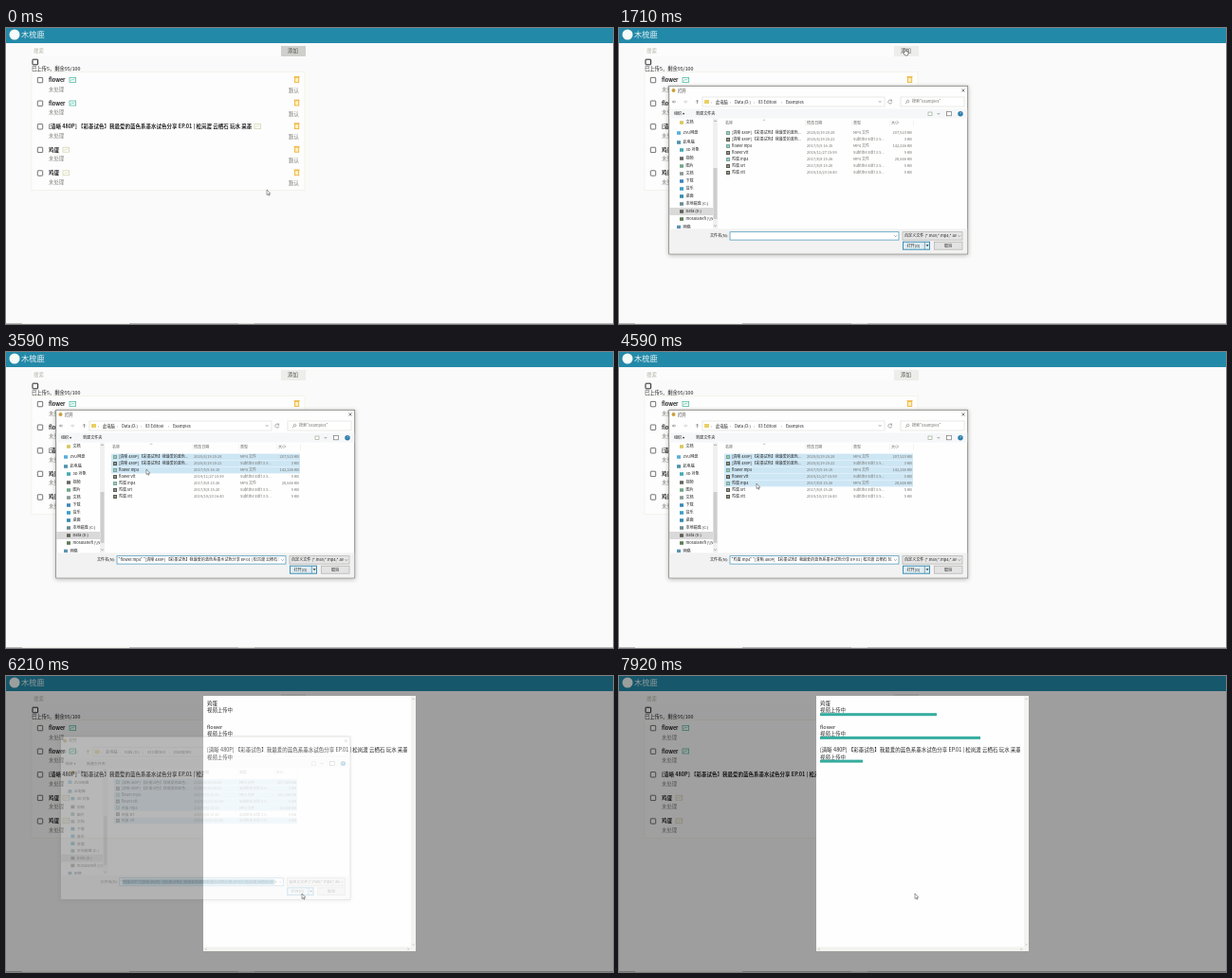
These frames come from a looping animation (640 by 313 pixels, 8 s). An HTML page:

```html
<!DOCTYPE html>
<html lang="zh-CN">
<head>
<meta charset="utf-8">
<title>上传视频</title>
<style>
  html, body { margin: 0; width: 100%; height: 100%; overflow: hidden; background: #fafafa; }
  #stage { display: block; width: 100vw; height: 100vh; }
  text { font-family: "Noto Sans CJK SC", "Noto Sans CJK", "Noto Sans", sans-serif; white-space: pre; }
</style>
</head>
<body>
<svg id="stage" viewBox="0 0 640 313"></svg>
<script>
const LOOP = 8000;
const INK = '#222', MUTED = '#858580', BLUE = '#3f8fb4';
const TITLE = '[清晰 480P] 【彩墨试色】我最爱的蓝色系墨水试色分享 EP.01 | 松岚渡 云栖石 玩水 采墨';
const SHORT = '[清晰 480P] 【彩墨试色】我最爱的蓝色...';

// Markup helpers; text is placed by its vertical centre.
const text = (x, cy, str, size = 5.5, fill = INK, attrs = '') =>
  `<text x="${x}" y="${cy + size * 0.36}" font-size="${size}px" fill="${fill}" ${attrs}>${str}</text>`;
const rect = (x, y, w, h, fill, attrs = '') =>
  `<rect x="${x}" y="${y}" width="${w}" height="${h}" fill="${fill}" ${attrs}/>`;
const box = (x, y, w, h, fill, stroke, width = 0.7, attrs = '') =>
  rect(x, y, w, h, fill, `stroke="${stroke}" stroke-width="${width}" ${attrs}`);
const path = (d, stroke, width = 0.7, fill = 'none') =>
  `<path d="${d}" fill="${fill}" stroke="${stroke}" stroke-width="${width}"/>`;
const circle = (x, y, r, fill) => `<circle cx="${x}" cy="${y}" r="${r}" fill="${fill}"/>`;
const group = (id, content, attrs = '') => `<g id="${id}" ${attrs}>${content}</g>`;
const clip = (x, y, w, h, content) =>
  `<svg x="${x}" y="${y}" width="${w}" height="${h}" viewBox="${x} ${y} ${w} ${h}">${content}</svg>`;

function videoRow([name, iconX, iconColor], i) {
  const y = 55 + i * 24.6;
  return box(33.3, y - 2.6, 5.4, 5.4, '#fff', '#505050', 0.8, 'rx=".6"') +
    text(45, y, name, 5.5, INK, 'font-weight="700"') +
    box(iconX, y - 2.6, 6.6, 5, '#fdfdfb', iconColor, 0.8) +
    path(`M${iconX + 1} ${y + 1.2}l1.6-2 1.4 1 1.6-1.6`, iconColor) +
    text(45, y + 9.6, '未处理', 5.4, MUTED) +
    box(304.5, y - 2.8, 4.2, 5.2, '#fff0b8', '#eeb33c', 0.9) +
    path(`M303.6 ${y - 3.4}h6`, '#eeb33c', 0.9) +
    text(298, y + 11, '默认', 5.4, '#757570');
}

function page() {
  const videos = [
    ['flower', 67, '#55bda9'], ['flower', 67, '#55bda9'], [TITLE, 262, '#d8d6b4'],
    ['鸡蛋', 60, '#d8d6b4'], ['鸡蛋', 60, '#d8d6b4']
  ];
  return rect(0, 0, 640, 313, '#fafafa') +
    rect(0, 0, 640, 16, '#2389a9') + circle(9, 7, 5.5, '#f4fbf8') +
    text(16, 7, '木梳鹿', 8.2, '#e4f1f2') +
    rect(27, 19, 262, 11.5, '#fcfcfc') + text(29, 24.5, '搜索', 5.4, '#b2b2a6') +
    rect(290, 19, 26, 11, '#ededea') + rect(290, 19, 26, 11, '#c6c6c0', 'id="pressed"') +
    text(297, 24.5, '添加', 5.4, '#505050') +
    box(28, 33.2, 5.6, 5.6, '#fff', '#222', 1, 'rx=".5"') +
    text(27, 43.5, '已上传5，剩余95/100', 5.3) +
    box(27, 46.5, 288, 125, '#fdfdfd', '#f0f0e6') +
    videos.map(videoRow).join('') +
    rect(0, 312, 640, 1, '#b9b9b9') + rect(17, 312, 113, 1, '#f0f0ea') + rect(245, 312, 17, 1, '#dcdcd8');
}

const files = [
  [SHORT, '2020/4/19 20:28', '207,523 KB'],
  [SHORT, '2020/4/19 20:22', '3 KB'],
  ['flower.mp4', '2017/5/5 16:15', '142,246 KB'],
  ['flower.vtt', '2019/11/27 15:59', '5 KB'],
  ['鸡蛋.mp4', '2017/8/8 15:26', '28,646 KB'],
  ['鸡蛋.srt', '2017/8/8 15:20', '5 KB'],
  ['鸡蛋.vtt', '2019/10/23 16:40', '5 KB']
];
// Moment each file is clicked; the sixth is skipped.
const pickedAt = [2650, 3080, 3520, 3980, 4430, Infinity, 5090];

function fileRow([name, date, size], i) {
  const y = 111 + i * 7, isVideo = i % 2 === 0 && i < 6;
  return rect(111, y - 3.4, 199, 6.8, '#cde6f4', `id="row${i}"`) +
    rect(113, y - 2, 4, 4, isVideo ? '#78a99c' : '#5a5a50') +
    path(`M114 ${y}h2`, '#fff') + text(119, y, name, 4) +
    text(198, y, date, 4, '#757570') +
    text(247, y, isVideo ? 'MP4 文件' : 'Subtitle Edit 3.5...', 4, '#757570') +
    text(309, y, size, 4, '#757570', 'text-anchor="end"');
}

function sidebar() {
  const places = [
    ['文档', 100, '#d8c860'], ['ZVU网盘', 111, '#5aaedb', 1], ['此电脑', 121, '#4f93ad', 1],
    ['3D 对象', 129, '#4aa8b4'], ['视频', 138, '#666660'], ['图片', 146, '#70a78b'],
    ['文档', 154, '#8b9a96'], ['下载', 162, '#3d88ba'], ['音乐', 170, '#3d9fc7'],
    ['桌面', 178, '#398cae'], ['本地磁盘 (C:)', 186, '#6e8b95'], ['Data (D:)', 194, '#60605a'],
    ['mosulanefi (\\\\v', 202, '#5f7d56'], ['网络', 210.5, '#5b93b0', 1]
  ];
  const items = places.map(([name, y, color, root]) => {
    const x = root ? 61 : 64;
    return rect(x, y - 1.8, 4, 3.6, color) + text(x + 6.5, y, name, 4.1);
  }).join('');
  return clip(53, 96, 46, 116.5, rect(53, 190, 46, 8, '#d9d9d9') + items) +
    rect(99, 96, 5, 116, '#f0f0f0') + rect(99.5, 148, 4, 54, '#cdcdcd') +
    path('M100.3 99l1.2-1.2 1.2 1.2M100.3 208.5l1.2 1.2 1.2-1.2', '#777');
}

function dialog() {
  const crumbs = [[102, '此电脑'], [122, 'Data (D:)'], [147, '03 Editool'], [176, 'Examples']];
  return box(52.7, 61.3, 315, 177.6, '#fefefe', '#85857c', 0.9, 'filter="url(#shadow)"') +
    circle(57.5, 66, 2, '#c9a13c') + text(62, 66, '打开', 4.2) +
    path('M361.5 64.5l3 3m0-3l-3 3', '#555') +
    path('M60 78h-3.5m1.4-1.4L56.5 78l1.4 1.4', '#777') +
    path('M68 78h3.5m-1.4-1.4l1.4 1.4-1.4 1.4', '#c0c0b8') +
    path('M82.5 80v-3.8m-1.4 1.4l1.4-1.4 1.4 1.4', '#777') +
    box(88, 73, 192, 10, '#fff', '#dededa') + rect(90, 76, 5, 4, '#e9cf62') +
    crumbs.map(([x, s]) => text(x - 5, 78, '›', 4.2, '#777') + text(x, 78, s, 4.2)).join('') +
    path('M273.8 77.2l1.3 1.3 1.3-1.3', '#777') +
    path('M287.6 77a2 2 0 1 0 .2 1.6m-.2-3v1.6h-1.5', '#777', 0.6) +
    box(297, 73, 67, 10, '#fff', '#dededa') +
    path('M302 80l1.5-1.6a1.3 1.3 0 1 1 .2.2', '#777', 0.6) +
    text(309, 78, '搜索"Examples"', 4.1, '#757570') +
    rect(53.2, 85.5, 314, 10, '#f6f7f8') +
    text(58, 90.5, '组织 ▾', 4.1) + text(81, 90.5, '新建文件夹', 4.1) +
    box(326, 89, 4, 3.5, '#fff', '#9cab98') + path('M335.6 90l1.3 1.3 1.3-1.3', '#777') +
    box(345.5, 88.5, 5, 4.3, '#fff', '#777') + circle(360, 90.7, 2.7, '#287caa') +
    text(360, 90.7, '?', 4, '#fff', 'text-anchor="middle"') +
    sidebar() +
    [[112, '名称'], [198, '修改日期'], [247, '类型'], [287, '大小']]
      .map(([x, s]) => text(x, 100.5, s, 4.1, '#6a6a66')).join('') +
    path('M152 98l1.2-1.2 1.2 1.2', '#888', 0.5) +
    path('M196.5 97v7M245.5 97v7M285.5 97v7M310.5 97v7', '#e8e8e4', 0.5) +
    files.map(fileRow).join('') +
    rect(53.2, 212.5, 314, 26, '#f2f2f2') +
    text(96, 220, '文件名(N):', 4.1) +
    box(117, 215.7, 178, 8.4, '#fff', BLUE) +
    rect(120, 217.2, 165, 5.4, '#4a9cc5', 'id="fieldMark"') +
    clip(118, 216, 170, 8, text(118.5, 220, '', 4.1, INK, 'id="fileName"')) +
    path('M290.3 219.3l1.3 1.3 1.3-1.3', '#777') +
    box(299, 215.7, 63, 8.4, '#e6e6e6', '#b0b0ac') +
    clip(300, 216, 56, 8, text(301, 220, '自定义文件 (*.m4v;*.mp4;*.avi', 4.1)) +
    path('M357.5 219.3l1.3 1.3 1.3-1.3', '#777') +
    box(299.5, 226.2, 28, 8, '#e1edf2', BLUE, 1) + path('M322.3 226v8', BLUE) +
    text(303.5, 230.2, '打开(O)', 4.1) +
    path('M323.8 229.3h2.6l-1.3 1.7z', '#333', 0.2, '#333') +
    box(332.5, 226.2, 29.5, 8, '#e3e3e3', '#b0b0ac') + text(343, 230.2, '取消', 4.1);
}

function uploads() {
  const entries = ['鸡蛋', 'flower', TITLE].map((name, i) => {
    const y = 29 + i * 24.7;
    return clip(212, y - 5, 211, 10, text(212, y, name)) + text(212, y + 7.2, '视频上传中', 5.4, '#333') +
      rect(212, y + 10.2, 0, 3, '#35ad9f', `id="bar${i}"`);
  }).join('');
  return rect(0, 0, 640, 313, 'rgba(0,0,0,.37)') +
    rect(208, 21, 224, 270, '#fefefe') + entries +
    rect(427, 21, 5, 270, '#f3f3f0') + rect(208, 286.5, 224, 4.5, '#f3f3f0') +
    path('M428.4 25l1.2-1.2 1.2 1.2M428.4 283.5l1.2 1.2 1.2-1.2M211.5 287.6l-1.2 1.2 1.2 1.2M423.5 287.6l1.2 1.2-1.2 1.2', '#aaa', 0.6);
}

const arrow = path('M0 0V5.6L1.3 4.4 2.1 6.3 2.9 6 2.1 4.2H3.8Z', '#3c3c3c', 0.5, '#fff');
const hand = path('M0 .6Q.7-.5 1.4.6V2.6L4 3.2V5.4L3.3 7H.6L-1.4 4.3-.8 3.7 0 4.2Z', '#3c3c3c', 0.6, '#fff');

document.getElementById('stage').innerHTML =
  '<filter id="shadow" x="-10%" y="-10%" width="120%" height="120%"><feDropShadow dx="0" dy="1" stdDeviation="2.2" flood-color="#333" flood-opacity=".35"/></filter>' +
  page() + group('modal', uploads()) + group('picker', dialog()) +
  group('cursor', group('arrow', arrow) + group('hand', hand));

const el = id => document.getElementById(id);
const show = (id, visible) => el(id).setAttribute('visibility', visible ? 'inherit' : 'hidden');
const clamp = v => Math.max(0, Math.min(1, v));
const ramp = (t, from, to) => clamp((t - from) / (to - from));
const smooth = u => u * u * (3 - 2 * u);

// Keys are [time, ...values]; returns the values at time t.
function track(keys, t, ease = u => u) {
  if (t <= keys[0][0]) return keys[0].slice(1);
  const next = keys.findIndex(k => k[0] > t);
  if (next < 0) return keys[keys.length - 1].slice(1);
  const a = keys[next - 1], b = keys[next], u = ease(ramp(t, a[0], b[0]));
  return a.slice(1).map((v, i) => v + (b[i + 1] - v) * u);
}

const cursorKeys = [
  [40, 275, 171], [500, 301, 22], [1790, 301, 22], [2430, 152, 108], [2700, 152, 108],
  [3040, 150, 117], [3140, 150, 117], [3480, 148, 124], [3580, 148, 124], [3930, 147, 131],
  [4050, 147, 131], [4400, 145, 139], [4640, 145, 139], [5030, 144, 152], [5160, 144, 152],
  [5800, 312, 230]
];
const barKeys = [
  [[6350, 0], [7630, 104], [7920, 123]],
  [[6350, 0], [7630, 155], [7920, 169]],
  [[6700, 0], [7630, 32], [7920, 45]]
];

function draw(t) {
  const [x, y] = track(cursorKeys, t, smooth);
  el('cursor').setAttribute('transform', `translate(${x} ${y})`);
  const overButton = x > 290 && y < 30 && t < 2000;
  show('hand', overButton);
  show('arrow', !overButton);
  el('pressed').setAttribute('opacity', 0.75 - 0.75 * ramp(t, 960, 1450));

  const shown = ramp(t, 1270, 1470) * (1 - ramp(t, 6090, 6250));
  const scale = 0.96 + 0.04 * shown;
  el('picker').setAttribute('opacity', shown);
  el('picker').setAttribute('transform', `translate(210.5 150) scale(${scale}) translate(-210.5 -150)`);

  let last = -1;
  pickedAt.forEach((time, i) => {
    const picked = t >= time;
    const hovered = t > 2300 && t < 5250 && Math.abs(y + 2 - 111 - i * 7) < 3.5;
    if (picked) last = i;
    el('row' + i).setAttribute('opacity', picked ? 1 : hovered ? 0.65 : 0);
  });
  const name = i => i < 2 ? TITLE + (i ? '.vtt' : '.mp4') : files[i][0];
  el('fileName').textContent = last < 0 ? '' : last === 0 ? name(0) : `"${name(last)}" "${name(0)}"`;
  show('fieldMark', t > 6000);

  el('modal').setAttribute('opacity', ramp(t, 6010, 6190));
  barKeys.forEach((keys, i) => el('bar' + i).setAttribute('width', track(keys, t)[0]));
}

const start = performance.now();
function tick() {
  draw((performance.now() - start) % LOOP);
  requestAnimationFrame(tick);
}
tick();
</script>
</body>
</html>
```
